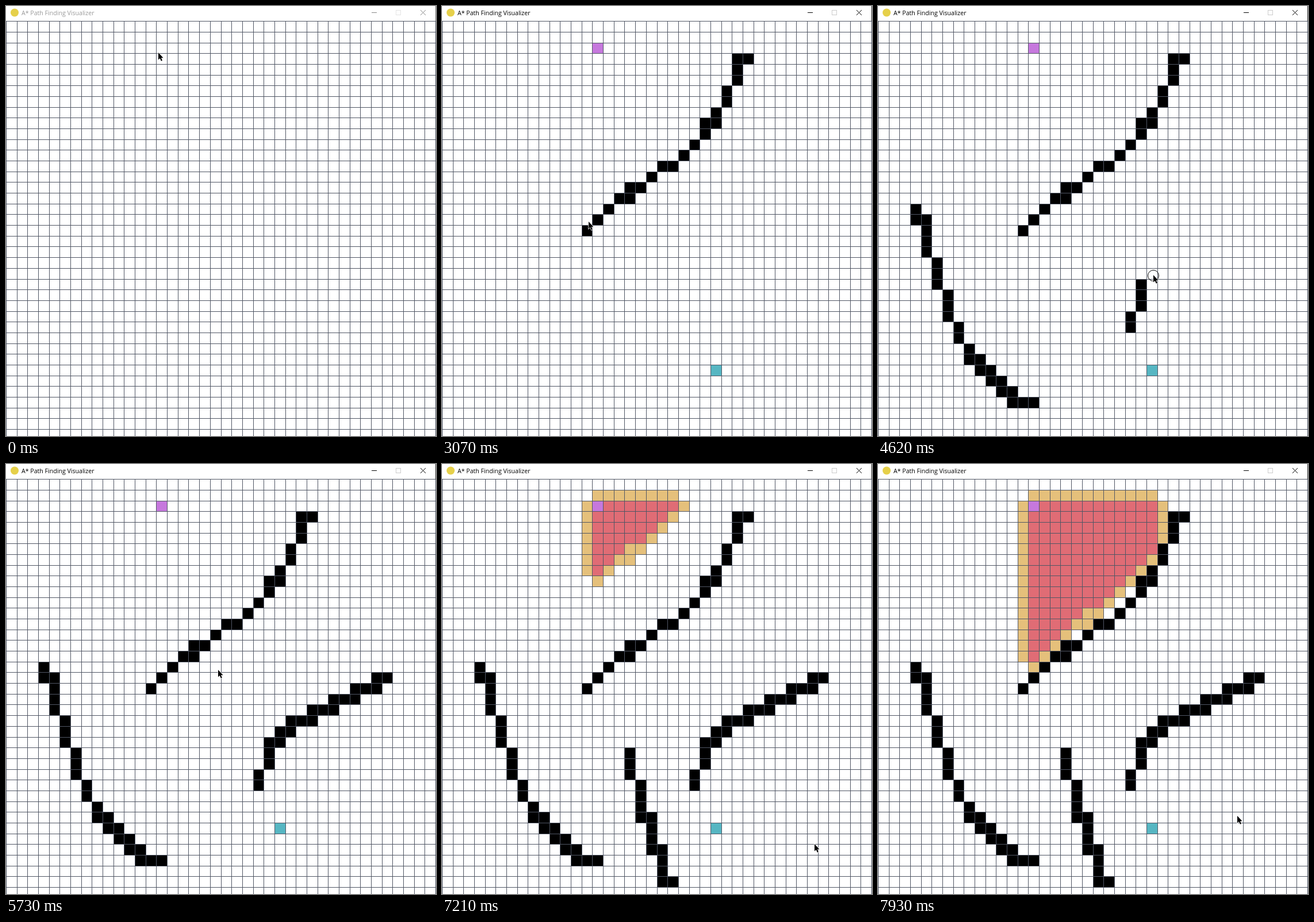
An HTML page with a canvas for the animation above (8000 ms loop, 748 by 748 pixels).

```html
<!DOCTYPE html>
<html lang="en">
<head>
<meta charset="utf-8">
<title>A* Path Finding Visualizer</title>
<style>
  html, body { margin: 0; width: 100%; height: 100%; overflow: hidden; background: #fff; }
  canvas { display: block; }
  #title { position: absolute; left: 27px; top: 4px; font: 10.6px/16px "Open Sans", "Noto Sans", sans-serif; white-space: nowrap; }
</style>
</head>
<body>
<canvas id="stage" width="748" height="748"></canvas>
<div id="title">A* Path Finding Visualizer</div>
<script>
const ctx = document.getElementById('stage').getContext('2d');
const title = document.getElementById('title');
const LOOP = 8000, REFRESH = 92, PHASE = 14;
const SIZE = 748, N = 40, GAP = (SIZE - 1) / N, TOP = 26.3;
const START = [14, 2], END = [25, 32];
const LAG = 22;               // walls trail the pointer by this many ms
const SEARCH_FROM = 6914, NODES_PER_REFRESH = 11;

const colX = i => Math.round(i * GAP);
const rowY = j => Math.round(TOP + j * GAP);
const key = (x, y) => y * N + x;

// A dragged line through a few points (in cells), sampled three times per cell.
function stroke(from, to, ...knots) {
  const samples = [knots[0]];
  for (let i = 1; i < knots.length; i++) {
    const [ax, ay] = knots[i - 1], [bx, by] = knots[i];
    const n = Math.round(3 * Math.hypot(bx - ax, by - ay));
    for (let k = 1; k <= n; k++) {
      const u = k / n;
      samples.push([ax * (1 - u) + bx * u, ay * (1 - u) + by * u]);
    }
  }
  const last = samples.length - 1;
  return {
    from, to,
    track: samples.map(([x, y], k) => [from + (to - from) * k / last, x * GAP, TOP + y * GAP]),
    cells: samples.map(p => p.map(Math.floor))
  };
}

const strokes = [
  stroke(2060, 2620, [13.5, 19.5], [16.1, 16.9], [19.1, 14.9], [20.1, 13.9], [22.1, 12.9],
    [24.1, 10.9], [26.1, 7.9], [27.1, 5.9], [27.6, 3.6], [28.4, 3.4]),
  stroke(3230, 3660, [3.52, 17.3], [5, 22], [7, 28], [8, 30], [9, 31.5], [12.5, 35], [14.5, 35.6]),
  stroke(4518, 4810, [23.3, 28.6], [25.3, 24], [26.5, 23], [35.4, 18.55]),
  stroke(6100, 6600, [17.09, 25.1], [21.1, 37.8])
];

// Pointer: time, x, y of the free moves, joined with the drags.
const track = [
  [770, 265, 82], [1400, 474, 633], [1580, 474, 633], [1670, 446, 577], [1870, 252, 391],
  [2800, 420, 352], [3050, 255, 376], [4180, 440, 572], [4340, 450, 631],
  [5250, 705, 480], [5420, 600, 557], [5840, 274, 278],
  [6822, 469, 745], [7200, 653, 660], [7558, 628, 610], [7926, 625, 613],
  ...strokes.flatMap(s => s.track)
].sort((a, b) => a[0] - b[0]);

// A*: notes at which iteration each cell is opened and closed.
function search() {
  const blocked = new Set(strokes.flatMap(s => s.cells.map(c => key(...c))));
  const cost = (x, y, g) => g + Math.abs(x - END[0]) + Math.abs(y - END[1]);
  const [sx, sy] = START;
  const seen = new Map([[key(sx, sy), { x: sx, y: sy, g: 0, f: cost(sx, sy, 0), opened: 0 }]]);
  const queue = [...seen.values()];
  for (let n = 1; n < 160 && queue.length; n++) {
    let best = 0;
    queue.forEach((c, i) => { if (c.f < queue[best].f) best = i; });
    const cur = queue.splice(best, 1)[0];
    cur.closed = n;
    for (const [dx, dy] of [[1, 0], [-1, 0], [0, 1], [0, -1]]) {
      const x = cur.x + dx, y = cur.y + dy, k = key(x, y);
      if (x < 0 || y < 0 || x >= N || y >= N || blocked.has(k) || seen.has(k)) continue;
      const cell = { x, y, g: cur.g + 1, f: cost(x, y, cur.g + 1), opened: n };
      seen.set(k, cell);
      queue.push(cell);
    }
  }
  return [...seen.values()];
}
const visited = search();

function rect(color, x, y, w, h) {
  ctx.fillStyle = color;
  ctx.fillRect(x, y, w, h);
}

function fillCell(color, x, y) {
  rect(color, colX(x), rowY(y), colX(x + 1) - colX(x), rowY(y + 1) - rowY(y));
}

function drawBar(active) {
  const ink = active ? '#000' : '#888';
  title.style.color = active ? '#000' : '#999';
  ctx.fillStyle = '#e6d04a';
  ctx.beginPath();
  ctx.arc(15, 11.5, 7, 0, 7);
  ctx.fill();
  rect(ink, 636, 11, 9, 1);
  ctx.lineWidth = 1;
  ctx.strokeStyle = active ? '#ccc' : '#e4e4e4';
  ctx.strokeRect(678.5, 7.5, 8, 8);
  ctx.strokeStyle = ink;
  ctx.beginPath();
  ctx.moveTo(721, 7); ctx.lineTo(730, 16);
  ctx.moveTo(730, 7); ctx.lineTo(721, 16);
  ctx.stroke();
  rect(active ? '#333' : '#777', SIZE - 1, 0, 1, rowY(0));
}

function drawGrid() {
  const line = '#505664';
  for (let i = 0; i <= N; i++) {
    rect(line, colX(i), rowY(0), 1, SIZE);
    rect(line, 0, rowY(i), SIZE, 1);
  }
}

function pointerAt(t) {
  const i = track.findIndex(p => p[0] > t);
  if (i <= 0) return track[i < 0 ? track.length - 1 : 0].slice(1);
  const [t0, x0, y0] = track[i - 1], [t1, x1, y1] = track[i];
  const u = (t - t0) / (t1 - t0);
  return [x0 + (x1 - x0) * u, y0 + (y1 - y0) * u];
}

const arrow = new Path2D('M0-1V11.5L2.8 9L4.9 13.7L6.9 12.8L4.9 8.3H8.5Z');

function drawPointer(t) {
  const [x, y] = pointerAt(t).map(Math.round);
  ctx.save();
  ctx.translate(x, y);
  if (strokes.some(s => t >= s.from && t <= s.to + LAG)) {
    ctx.strokeStyle = '#000';
    ctx.lineWidth = 1;
    ctx.beginPath();
    ctx.arc(0, 0, 9.5, 0, 7);
    ctx.stroke();
  }
  ctx.strokeStyle = '#fff';
  ctx.lineWidth = 1.4;
  ctx.stroke(arrow);
  ctx.fillStyle = '#000';
  ctx.fill(arrow);
  ctx.restore();
}

function draw(t) {
  rect('#fff', 0, 0, SIZE, SIZE);
  drawBar(t >= 560);
  const iteration = (t - SEARCH_FROM) / REFRESH * NODES_PER_REFRESH;
  if (iteration > 0)
    for (const c of visited)
      if (c.opened <= iteration) fillCell(c.closed < iteration ? '#e06c75' : '#e5c07b', c.x, c.y);
  for (const s of strokes)
    s.cells.forEach((c, k) => { if (s.track[k][0] + LAG <= t) fillCell('#000', ...c); });
  if (t >= 650) fillCell('#c678dd', ...START);
  if (t >= 1480) fillCell('#56b6c2', ...END);
  drawGrid();
  drawPointer(t);
}

function tick(now) {
  const t = now % LOOP;
  draw(Math.max(0, PHASE + Math.floor((t - PHASE) / REFRESH) * REFRESH));
  requestAnimationFrame(tick);
}
draw(0);
requestAnimationFrame(tick);
</script>
</body>
</html>
```
